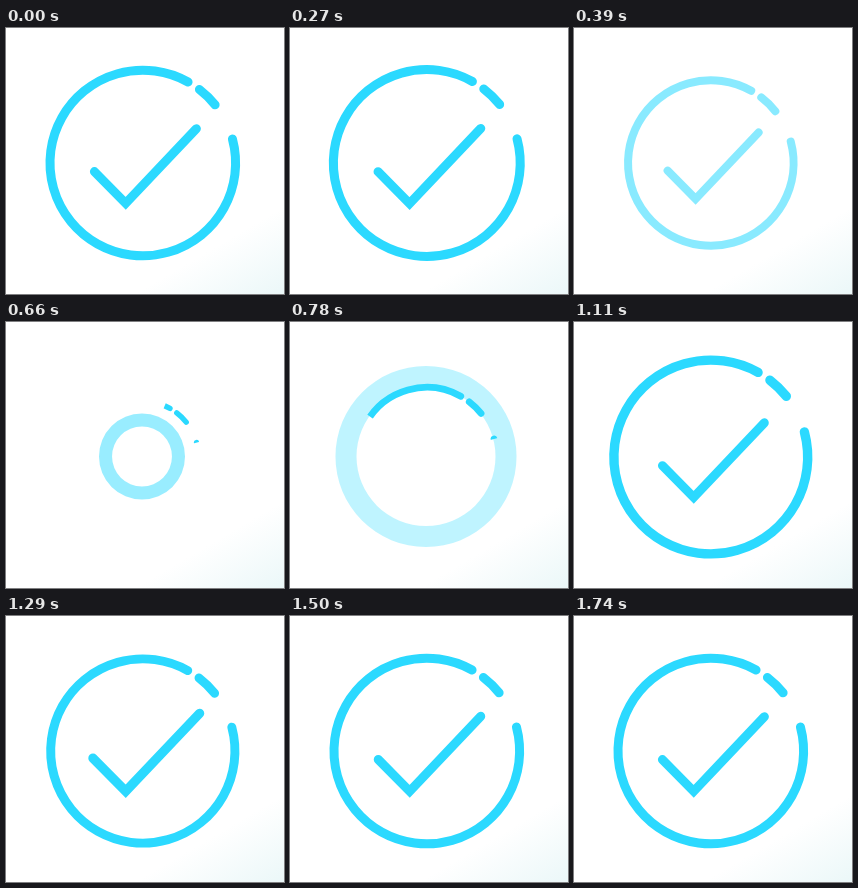
These frames come from a looping animation (278x266 px, 1.77 s). An HTML page with a canvas:

```html
<!DOCTYPE html>
<html lang="en">
<head>
<meta charset="utf-8">
<title>Check mark</title>
<style>
  html, body { margin: 0; width: 100%; height: 100%; overflow: hidden; background: #fff; }
  canvas { display: block; width: 278px; height: 266px; }
</style>
</head>
<body>
<canvas id="stage"></canvas>
<script>
const LOOP = 1770, STEP = 30;
const W = 278, H = 266;
const CX = 136.8, CY = 135, R = 92.8, LINE = 9;
const BLUE = '#2bd9ff';

const canvas = document.getElementById('stage');
const ctx = canvas.getContext('2d');
const dpr = window.devicePixelRatio || 1;
canvas.width = W * dpr;
canvas.height = H * dpr;

const rad = deg => deg * Math.PI / 180;
const clamp = v => Math.max(0, Math.min(1, v));
const phase = (t, start, length) => clamp((t - start) / length);

const backIn = (p, s = 1.5) => p * p * ((s + 1) * p - s);
const easeOut = p => 1 - (1 - p) ** 2;
// Damped swing that starts at 1 and settles at 0
const swing = (p, period) =>
  p >= 1 ? 0 : 2 ** (-10 * p) * Math.cos(2 * Math.PI * p / period);

function scaled(x, y, k, draw) {
  ctx.save();
  ctx.translate(x, y);
  ctx.scale(k, k);
  ctx.translate(-x, -y);
  draw();
  ctx.restore();
}

function drawBackground() {
  ctx.fillStyle = '#fff';
  ctx.fillRect(0, 0, W, H);
  const glow = ctx.createLinearGradient(240, 201, W, H);
  glow.addColorStop(0, 'rgba(234,247,248,0)');
  glow.addColorStop(1, 'rgba(234,247,248,.95)');
  ctx.fillStyle = glow;
  ctx.fillRect(0, 0, W, H);
}

function strokeArc(from, to) {
  ctx.beginPath();
  ctx.arc(CX, CY, R, rad(from), rad(to), true);
  ctx.stroke();
}

// drawn: share of the full turn revealed, counter-clockwise
function drawCircle(scale, drawn) {
  scaled(CX, CY, scale, () => {
    if (drawn < 1) {
      ctx.beginPath();
      ctx.moveTo(CX, CY);
      ctx.arc(CX, CY, 2 * R, rad(-15), rad(-15 - 360 * drawn), true);
      ctx.closePath();
      ctx.clip();
    }
    strokeArc(-38.8, -52.4);
    strokeArc(-60.8, -375);
  });
}

function drawCheck(scale) {
  scaled(119.5, 175, scale, () => {
    ctx.beginPath();
    ctx.moveTo(88.4, 143.6);
    ctx.lineTo(119.7, 175.3);
    ctx.lineTo(190.4, 100.7);
    ctx.stroke();
  });
}

function drawRipple(p) {
  if (p <= 0 || p >= 1) return;
  const outer = 237.7 * p - 113.3 * p * p;
  const inner = 157 * p - 36 * p * p;
  ctx.globalAlpha = 0.6 * (1 - p);
  ctx.beginPath();
  ctx.arc(136, 134.5, outer, 0, 2 * Math.PI);
  ctx.arc(136, 134.5, inner, 0, 2 * Math.PI, true);
  ctx.fill();
  ctx.globalAlpha = 1;
}

function drawExit(t) {
  const p = phase(t, 256, 194);
  if (p >= 1) return;
  ctx.globalAlpha = clamp(1.8 * (1 - p));
  scaled(CX, CY, 1 - backIn(p), () => {
    drawCircle(1, 1);
    drawCheck(1);
  });
  ctx.globalAlpha = 1;
}

function circleScale(t) {
  if (t < 980) return 0.5 + 0.5 * phase(t, 580, 400);
  if (t < 1130) return 1 + 0.045 * easeOut(phase(t, 980, 150));
  return 1 + 0.045 * swing(phase(t, 1130, 610), 0.5);
}

function drawEntry(t) {
  const p = phase(t, 580, 400);
  if (p <= 0) return;
  drawRipple(p);
  const drawn = p < 0.5 ? 0.72 * p : 0.36 + 1.28 * (p - 0.5);
  drawCircle(circleScale(t), drawn);
  const c = phase(t, 927.5, 810);
  if (c > 0) drawCheck(1 - swing(c, 0.3));
}

function render(t) {
  ctx.setTransform(dpr, 0, 0, dpr, 0, 0);
  drawBackground();
  ctx.fillStyle = ctx.strokeStyle = BLUE;
  ctx.lineWidth = LINE;
  ctx.lineCap = 'round';
  ctx.lineJoin = 'miter';
  if (t < 450) drawExit(t);
  else drawEntry(t);
}

const begin = performance.now();
function tick() {
  const t = (performance.now() - begin) % LOOP;
  render(Math.floor(t / STEP) * STEP);
  requestAnimationFrame(tick);
}
tick();
</script>
</body>
</html>
```
